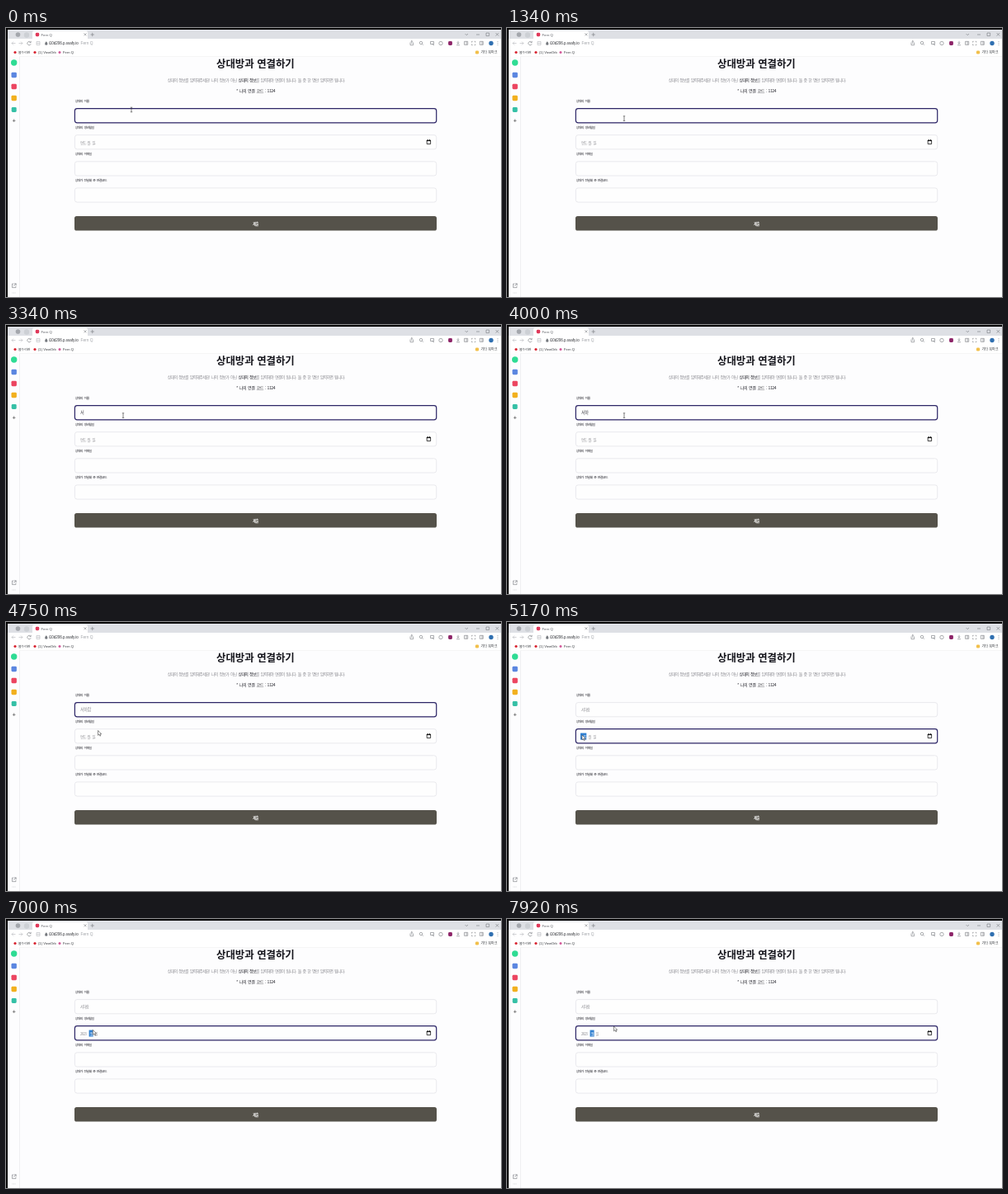
Recreate the animation shown at these times as an HTML page. Size 600 px wide and 326 px high, loop 8000 ms.

```html
<!DOCTYPE html>
<html lang="ko">
<head>
<meta charset="utf-8">
<title>상대방과 연결하기</title>
<style>
  html, body { margin: 0; width: 100%; height: 100%; overflow: hidden; background: #fdfdfe; }
  svg { display: block; width: 100%; height: 100%; }
  text { font-family: "Noto Sans CJK KR", "Noto Sans CJK", "Noto Sans", sans-serif; white-space: pre; }
  .ui { font-family: "Liberation Sans", "Noto Sans CJK KR", sans-serif; }
  .title { font-size: 12.4px; font-weight: 700; fill: #15151c; text-anchor: middle; }
  .lead { font-size: 5px; letter-spacing: -.72px; word-spacing: 1.2px; fill: #8c8c92; text-anchor: middle; }
  .lead tspan { fill: #26262e; font-weight: 500; }
  .code { font-size: 5.1px; letter-spacing: -.45px; word-spacing: .9px; fill: #26262e; text-anchor: middle; }
  .label { font-size: 3.9px; letter-spacing: -.55px; word-spacing: 1.1px; fill: #202028; }
  .value { font-size: 4.2px; letter-spacing: -.5px; }
  .submit { font-size: 4.2px; letter-spacing: -.6px; font-weight: 700; fill: #fff; text-anchor: middle; }
  .line { fill: none; stroke: #74777d; stroke-width: .6; }
  .pale { stroke: #b4b6bb; }
</style>
</head>
<body>
<svg viewBox="0 0 600 326" preserveAspectRatio="none">
  <rect width="600" height="326" fill="#fdfdfe"/>
  <rect width="600" height="13" fill="#dee0e5"/>
  <path d="M32 13.2V5.5Q32 3.5 34 3.5H97Q99 3.5 99 5.5V13.2Z" fill="#fff"/>
  <rect y="13" width="600" height="21.5" fill="#fff"/>
  <path d="M17 34.5H600" stroke="#f0f0f2" stroke-width=".6"/>
  <path d="M16.5 34.5V326" stroke="#e8e8ec" stroke-width=".7"/>
  <g id="chrome"></g>
  <g class="line">
    <path d="M94.5 6.3l3 3m0-3l-3 3M102.5 8h4.4m-2.2-2.2v4.4"/>
    <path d="M556.5 7l1.7 1.7L560 7M570 8h4M582 6h3.6v3.6h-3.6zM593.6 6l3.6 3.6m0-3.6l-3.6 3.6"/>
    <path class="pale" d="M11.5 18.5H7m2-2l-2 2l2 2M15.5 18.5H20m-2-2l2 2l-2 2M37 16.5h4v4h-4zM37 18.5h4"/>
    <path d="M29.8 17.3a2.2 2.2 0 1 0 .3 2M30.2 15.8v1.8h-1.8"/>
    <path d="M47.6 18.2h2.4v2h-2.4zM48.1 18.2v-.7a.7.7 0 0 1 1.4 0v.7" fill="#74777d"/>
    <path d="M490 17.5v3.2h3.6v-3.2M491.8 19v-3.5m-1.2 1.1l1.2-1.1l1.2 1.1"/>
    <circle cx="503" cy="18" r="1.7"/><path d="M504.3 19.3l1.4 1.4"/>
    <path d="M514.5 16.5h4v3h-4zM516.5 19.5l2.5 1.5"/>
    <circle cx="527" cy="18.5" r="2.2"/>
    <path d="M548 15.8v3.4m-1.4-1.4l1.4 1.4l1.4-1.4M546 20.7h4"/>
    <path d="M555.5 16.3h4.2v4h-4.2zM558 16.3v4"/>
    <path d="M564.5 17.5v-1.2h1.2m2 0h1.2v1.2m0 2v1.2h-1.2m-2 0h-1.2v-1.2"/>
    <path d="M574.3 16.3h4v4h-4zM577 16.3v4"/>
    <path d="M7.9 112.3h3.6m-1.8-1.8v3.6" stroke="#444"/>
    <path d="M9.5 310h-2v4.6h4.4v-2M10 309.8h2.2v2.2m0-2.2l-2.8 2.8"/>
    <path class="pale" d="M7.5 321h4" stroke-dasharray=".8 .8"/>
    <path d="M596 16v5" stroke-dasharray="1 1"/>
  </g>

  <text class="title" x="302.4" y="48.2">상대방과 연결하기</text>
  <text class="lead" x="303" y="65">상대의 정보를 입력해주세요! 나의 정보가 아닌 <tspan>상대의 정보</tspan>를 입력해야 연결이 됩니다. 둘 중 한 명만 입력하면 됩니다.</text>
  <text class="code" x="302.5" y="78.3">* 나의 연결 코드 : 1124</text>
  <g id="form"></g>
  <rect x="83" y="228" width="439" height="17.6" rx="2.6" fill="#55524a"/>
  <text class="submit" x="302.5" y="238.8">제출</text>
  <path d="M510.2 136.4h4.4v4.2h-4.4z" fill="none" stroke="#111" stroke-width=".8"/>
  <path d="M509.8 136.6h5.2M511.2 135v1.4m2.4-1.4v1.4" stroke="#111" stroke-width="1"/>

  <text class="value" id="name" x="90" y="108.3"></text>
  <rect id="mark" y="134.6" height="8" fill="#2f7fd0"/>
  <text class="value" id="year" y="140.5"></text>
  <text class="value" id="month" y="140.5"></text>
  <text class="value" id="day" y="140.5"></text>

  <path id="beam" d="M-1.2 -2.8H1.2M0 -2.8V2.8M-1.2 2.8H1.2" fill="none" stroke="#333" stroke-width=".6"/>
  <path id="arrow" d="M0 0V5.8L1.4 4.6L2.4 6.7L3.3 6.3L2.4 4.3H4.2Z" fill="#fff" stroke="#333" stroke-width=".55"/>
</svg>
<script>
const $ = id => document.getElementById(id);

function add(parent, tag, attrs, text) {
  const el = document.createElementNS("http://www.w3.org/2000/svg", tag);
  for (const k in attrs) el.setAttribute(k, attrs[k]);
  if (text) el.textContent = text;
  $(parent).append(el);
  return el;
}
const dot = (cx, cy, r, fill) => add("chrome", "circle", { cx, cy, r, fill });
const box = (cx, cy, s, fill) =>
  add("chrome", "rect", { x: cx - s / 2, y: cy - s / 2, width: s, height: s, rx: 1.4, fill });
const ui = (x, y, size, fill, text) =>
  add("chrome", "text", { class: "ui", x, y, "font-size": size, fill }, text);

// Browser frame
dot(14.5, 8, 2.8, "#a4a7ad");
dot(25, 8.5, 3.2, "#cdd0d5");
box(38, 8, 4.4, "#e0395a");
ui(42.5, 9.6, 4.3, "#55585e", "Fern Q");
ui(51.8, 20.2, 4.5, "#2c2e33", "i10d206.p.ssafy.io");
ui(90.5, 20.2, 4.8, "#a0a3a8", "Fern Q");
box(538.5, 18.5, 4.8, "#8d2468");
dot(588, 18.5, 2.7, "#2f6fb0");
dot(11, 29.5, 1.6, "#d8232f");
ui(15, 31.1, 3.9, "#33363b", "봄누리관");
dot(35, 29.5, 1.6, "#d8232f");
ui(39, 31.1, 4.1, "#33363b", "(1) ViewOrb");
dot(65, 29.5, 1.5, "#d35a9a");
ui(69, 31.1, 4.2, "#33363b", "Fern Q");
box(571, 29.5, 4.2, "#f2c04b");
ui(575.5, 31.1, 4.1, "#33363b", "기타 북마크");
dot(9.7, 42, 3.7, "#2fdc94");
box(9.7, 57, 6.4, "#5b86e0");
box(9.7, 71, 6.4, "#ec4560");
box(9.7, 85, 6.4, "#f2b01e");
box(9.7, 99, 6, "#35c0a6");
add("chrome", "rect", { width: 600, height: 2, fill: "#000" });
add("chrome", "rect", { width: 2, height: 326, fill: "#000" });

// Form
const labels = ["상대의 이름", "상대의 생년월일", "상대의 이메일", "상대가 전달해 준 연결코드"];
const fields = labels.map((label, i) => {
  const y = 97.6 + i * 32.1;
  add("form", "text", { class: "label", x: 83.7, y: y - 7.5 }, label);
  return add("form", "rect", { x: 83.4, y, width: 438.3, height: 17.2, rx: 2.8, fill: "#fefefe" });
});

const LOOP = 8000;
const TO_ARROW = 4600, FOCUS_DATE = 5090, YEAR_TYPED = 5600, YEAR_DONE = 6500;

// [time, x, y]
const path = [
  [0, 152, 99], [90, 152, 99], [900, 142, 109.6], [4420, 142, 109.6],
  [4750, 111.5, 131.5], [5030, 91, 137], [6650, 91, 137], [7500, 129.5, 130]
];
// [time, text]
const nameSteps = [[0, ""], [3200, "ㅅ"], [3320, "서"], [3800, "서하"], [4250, "서하람"]];
const yearSteps = [[0, "연도."], [FOCUS_DATE, "연도"], [YEAR_TYPED, "0002"], [5920, "0020"], [6250, "0202"], [YEAR_DONE, "2023"]];

const last = (steps, t) => steps.filter(s => s[0] <= t).pop()[1];

function pointAt(t) {
  const i = path.findIndex(p => p[0] > t);
  if (i < 0) return path[path.length - 1].slice(1);
  const [a, b] = [path[i - 1], path[i]];
  const k = (t - a[0]) / (b[0] - a[0]);
  const e = k * k * (3 - 2 * k);
  return [a[1] + (b[1] - a[1]) * e, a[2] + (b[2] - a[2]) * e];
}

function put(id, text, x, fill) {
  const el = $(id);
  el.textContent = text;
  el.setAttribute("x", x);
  el.style.fill = fill;
}

function draw(t) {
  const onDate = t >= FOCUS_DATE, typed = t >= YEAR_TYPED, done = t >= YEAR_DONE;
  const active = onDate ? 1 : 0;
  fields.forEach((f, i) => {
    f.setAttribute("stroke", i === active ? "#2c2566" : "#e4e4e9");
    f.setAttribute("stroke-width", i === active ? 1.2 : .8);
  });

  const gray = "#8c8c92", white = "#fff";
  put("name", last(nameSteps, t), 90, t < 4340 ? "#45454c" : gray);
  $("name").style.fontSize = onDate ? "" : "5.2px";
  put("year", last(yearSteps, t), 90, onDate && !done ? white : gray);
  put("month", onDate ? "월" : "월.", typed ? 101.7 : 98.5, done ? white : gray);
  put("day", onDate ? "일" : "일.", typed ? 107.5 : 104.5, gray);

  const mark = $("mark");
  mark.style.display = onDate ? "" : "none";
  mark.setAttribute("x", done ? 100.6 : 89);
  mark.setAttribute("width", done ? 5 : typed ? 11 : 7.3);

  const [x, y] = pointAt(t), arrow = t >= TO_ARROW;
  $("beam").style.display = arrow ? "none" : "";
  $("arrow").style.display = arrow ? "" : "none";
  $(arrow ? "arrow" : "beam").setAttribute("transform", `translate(${x} ${y})`);
}

const start = performance.now();
function tick() {
  draw((performance.now() - start) % LOOP);
  requestAnimationFrame(tick);
}
tick();
</script>
</body>
</html>
```
